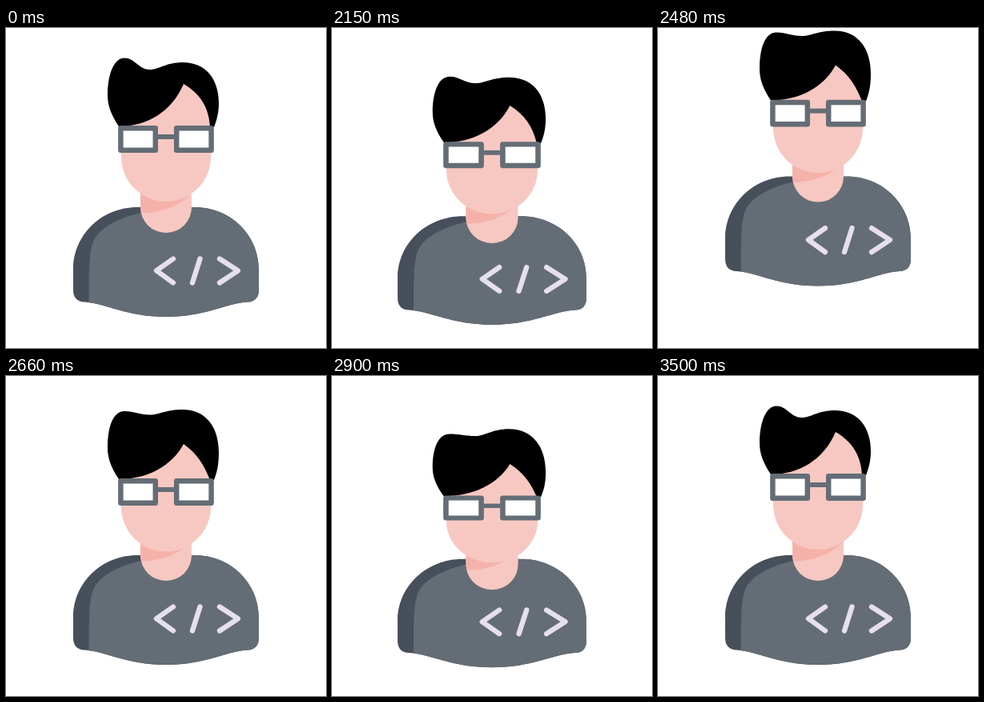
Animation, 400 px wide and 400 px high, one loop 3530 ms. Source, as an HTML page:

```html
<!DOCTYPE html>
<html lang="en">
<head>
<meta charset="utf-8">
<title>Developer avatar</title>
<style>
html, body { margin: 0; width: 100%; height: 100%; overflow: hidden; background: #fff; }
svg { display: block; width: 100%; height: 100%; }
.skin { fill: #f7c8c1; }
.line { fill: none; stroke-linecap: round; stroke-linejoin: round; }
</style>
</head>
<body>
<svg viewBox="0 0 400 400">
  <defs>
    <path id="torso" d="M164 224H236C280 224 316 258 316 302V327Q316 342 302 342.5C275 344 250 361 200 361S125 344 98 342.5Q84 342 84 327V302C84 258 120 224 164 224Z"/>
    <clipPath id="clip"><use href="#torso"/></clipPath>
    <rect id="lens" x="143.4" y="125.3" width="43.4" height="27.4"/>
  </defs>
  <g id="figure">
    <use href="#torso" fill="#464f5a"/>
    <path clip-path="url(#clip)" fill="#646d76" d="M169 220H320V370H103.5C104 305 103 283 109 267C117 248 146 236 169 231Z"/>
    <path class="line" stroke="#e6dfec" stroke-width="6.3" d="M209 288.5L188 303.3L209 318.5M242.5 288.5L233 318.5M267 288.5L290 303.3L267 318.5"/>
    <g id="neck">
      <path class="skin" d="M168 190H232V224A32 32 0 0 1 168 224Z"/>
      <path fill="#f5b2aa" d="M168 190H232V206C217 223 194 231 169 231.5L168 224Z"/>
    </g>
    <g id="head">
      <path id="face" class="skin"/>
      <path id="hair"/>
      <g id="glasses" stroke="#646d76">
        <g fill="#fff" stroke-width="6.5" stroke-linejoin="round">
          <use href="#lens"/>
          <use href="#lens" x="69.8"/>
        </g>
        <path stroke-width="6" d="M190 136H210"/>
      </g>
    </g>
  </g>
</svg>
<script>
const LOOP = 3530, START = 2030, STEP = 30;

// Each track is a list of [time, value]
const bounce = [[2000, 0], [2030, 3.4], [2070, 7.2], [2130, 9.7], [2200, 9.3], [2250, 6],
  [2280, 0], [2300, -7.5], [2640, -7.6], [2660, 0], [2700, 8.2], [2760, 9.8], [2900, 3.3],
  [3020, -2.2], [3080, -2], [3250, 2.9], [3500, 0]];
const squashing = [[2000, 0], [2030, 1], [2130, 2], [2200, 1.4], [2280, 0],
  [2660, 0], [2700, 2.4], [2760, 4], [2900, 2], [3000, 0]];
const nodding = [[2000, 0], [2030, .03], [2130, .5], [2270, 1], [2900, 1], [3080, 0]];
const dropping = [[2030, 0], [2130, .3], [2280, 0], [2660, 0], [2760, .75],
  [2830, 1.05], [2900, 1], [3060, 0]];
const leftHair = [[2900, 0], [3020, -3.5], [3110, -3.5], [3250, 0]];
const rightHair = [[2660, 0], [2840, -5], [2980, -5], [3080, -4], [3250, 0]];

const el = id => document.getElementById(id);
const figure = el('figure'), neck = el('neck'), head = el('head');
const face = el('face'), hair = el('hair'), glasses = el('glasses');

function slope(track, i) {
  const a = track[i - 1], b = track[i + 1];
  return a && b ? (b[1] - a[1]) / (b[0] - a[0]) : 0;
}

// Smooth cubic through the keys, flat outside them
function at(track, t) {
  const i = track.findIndex(k => k[0] > t) - 1;
  if (i < 0) return 0;
  const [ta, a] = track[i], [tb, b] = track[i + 1];
  if (a === b) return a;
  const u = (t - ta) / (tb - ta), v = 1 - u;
  return a * v * v * (1 + 2 * u) + b * u * u * (3 - 2 * u) +
    (tb - ta) * u * v * (v * slope(track, i) - u * slope(track, i + 1));
}

function liftAt(t) {
  const x = (t - 2470) / 190;
  return Math.abs(x) < 1 ? -38.5 * (1 - x * x) : at(bounce, t);
}

function draw(time) {
  const t = time < START ? 0 : START + Math.floor((time - START) / STEP) * STEP;
  const lift = liftAt(t), squash = at(squashing, t), nod = at(nodding, t);
  const drop = at(dropping, t), left = at(leftHair, t), right = at(rightHair, t);

  const low = 6 * nod, eye = 122 + low;
  const apex = 70 + 15 * nod, jaw = 161 + 2.5 * nod;
  const bump = 37.5 + 6.5 * nod + left;
  const dip = 52 - 3.5 * nod + left * .7 + right * .35;
  const crown = 43 - nod + right;

  figure.setAttribute('transform',
    `translate(200 ${361 + lift}) scale(${1 + squash / 116} ${1 - squash * .005}) translate(-200 -361)`);
  neck.setAttribute('transform', `translate(0 ${7 * drop})`);
  head.setAttribute('transform',
    `translate(0 ${eye + 16 * drop}) scale(1 ${1 - .075 * drop}) translate(0 ${-eye})`);
  glasses.setAttribute('transform', `translate(0 ${low})`);
  face.setAttribute('d', `M144 ${jaw}V${apex}H256V${jaw}A56 56 0 0 1 144 ${jaw}Z`);
  hair.setAttribute('d',
    `M141 ${123 + low}C131 ${108 + low} 127 ${96 + low} 127 ${84 + low}` +
    `C127 ${60 + low / 2} 134 ${bump} 148 ${bump}` +
    `C161 ${bump} 166 ${dip} 180 ${dip}` +
    `C191 ${dip} 200 ${crown} 221 ${crown}` +
    `C250 ${crown} 266 ${64 + right / 2} 266 ${94 + low / 3}` +
    `C266 ${107 + low} 263 ${116 + low} 260 ${124 + low}H255` +
    `C${254 - low} ${100 + 2 * low} ${243 - 4 * nod} ${82 + 15 * nod} 222 ${apex}` +
    `C207 ${105 + 8 * nod} 176 ${123 + low} 141 ${123 + low}Z`);
}

const begin = performance.now();
function tick() {
  draw((performance.now() - begin) % LOOP);
  requestAnimationFrame(tick);
}
tick();
</script>
</body>
</html>
```
